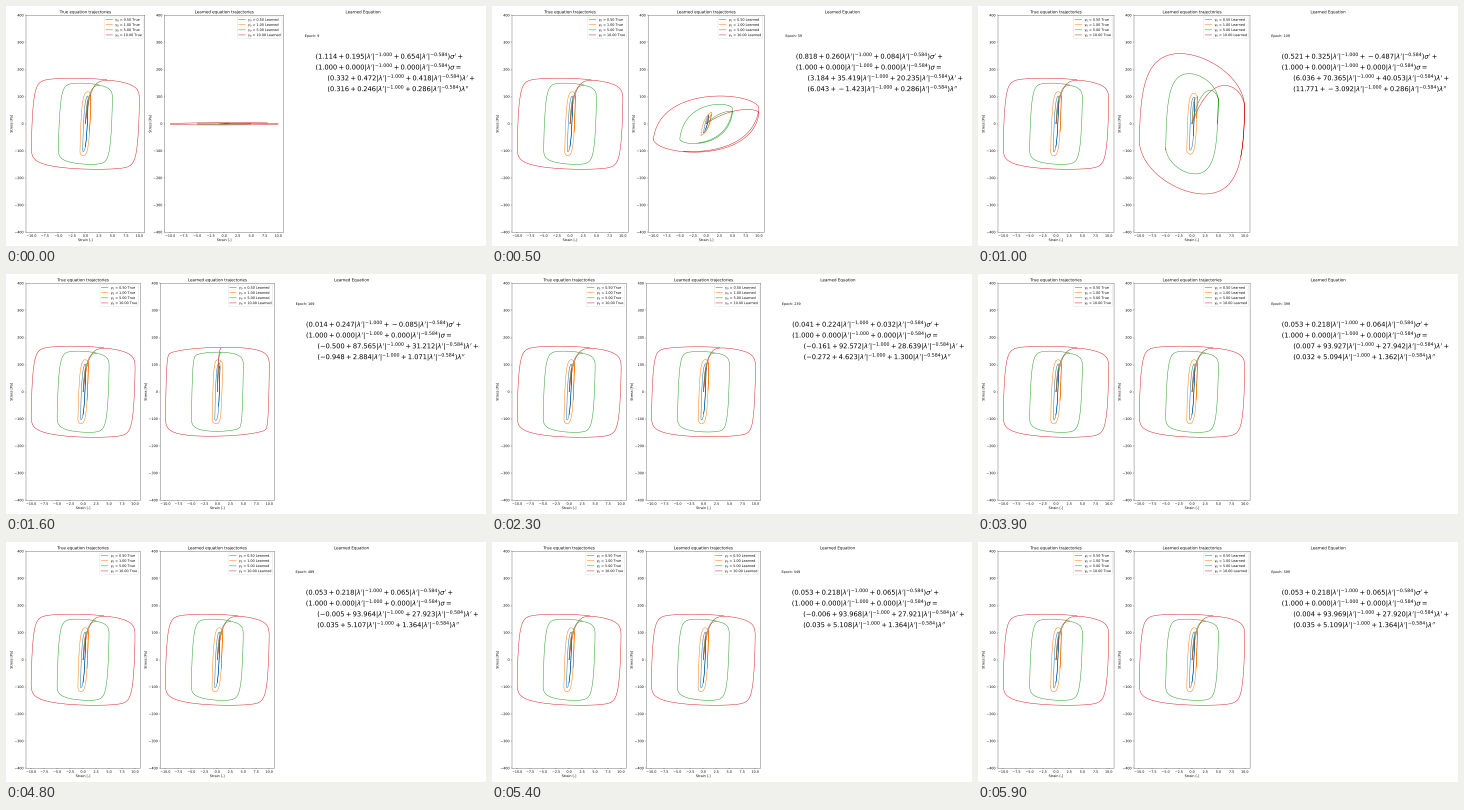
A matplotlib script that plays this animation: 480 px wide and 240 px high, repeating every 6000 ms.

```python
import numpy as np
import matplotlib.pyplot as plt
from matplotlib import patheffects
from matplotlib.animation import FuncAnimation
from matplotlib.lines import Line2D
from matplotlib.patches import FancyBboxPatch
from matplotlib.transforms import ScaledTranslation

# Text drawn as outlines keeps sub-pixel placement at this small size.
plt.rcParams.update({
    "font.family": "DejaVu Sans",
    "path.effects": [patheffects.Normal()],
    "path.snap": False,
    "text.hinting": "none",
    "savefig.dpi": "figure",
})

W, H = 480, 240
FRAMES, GROWTH = 60, 10
TOP, BOTTOM, GAP = 9.3, 226.2, 20
POWER = 0.584
AMPS = np.array([0.5, 1.0, 5.0, 10.0])
COLORS = ["tab:blue", "tab:orange", "tab:green", "tab:red"]

# Rows: relaxation, viscosity, inertia. Columns: powers 0, -1, -POWER.
START = np.array([[1.114, 0.195, 0.654], [0.332, 0.472, 0.418], [0.316, 0.246, 0.286]])
PEAK = np.array([[0.521, 0.325, -0.487], [6.036, 70.365, 40.053], [11.771, -3.092, 0.286]])
END = np.array([[0.053, 0.218, 0.065], [0, 93.97, 27.92], [0.035, 5.109, 1.364]])


def learned_coefs():
    """Linear growth to the peak, then decay; constant terms overshoot once."""
    k = np.arange(FRAMES)[:, None, None]
    late = np.maximum(k - GROWTH, 0)
    decay = np.exp(-late / 4.6)
    overshoot = (1 - late / 3.5) * np.exp(-late / 2.8)
    fade = np.concatenate([overshoot, decay, decay], axis=2)
    coefs = np.where(k < GROWTH, START + (PEAK - START) * k / GROWTH,
                     END + (PEAK - END) * fade)
    wobble = 0.008 * (1 - decay) * np.cos(2 * np.pi * (k - 39.2) / 24)
    coefs[:, 1, 0] += wobble[:, 0, 0]
    return coefs.transpose(1, 0, 2)


CYCLE = 800
times = np.linspace(0, 4 * np.pi, 2 * CYCLE + 1)
strain = AMPS * np.sin(times)[:, None]


def slope(t, stress, coefs):
    """Stress rate, with the whole equation multiplied by |strain rate|."""
    rate, accel = AMPS * np.cos(t), -AMPS * np.sin(t)
    r = np.abs(rate)
    basis = np.stack([r, np.ones_like(r), r ** (1 - POWER)])
    tau, eta, kappa = coefs @ basis
    return (eta * rate + kappa * accel - r * stress) / tau


def simulate(coefs):
    dt = times[1]
    stress = np.zeros((coefs.shape[1], len(AMPS)))
    path = [stress]
    for t in times[:-1]:
        mid = stress + dt / 2 * slope(t, stress, coefs)
        stress = stress + dt * slope(t + dt / 2, mid, coefs)
        path.append(stress)
    path = np.array(path)
    # Thin strokes darken where they overlap, so skip what retraces cycle one.
    retraced = np.abs(path[CYCLE:] - path[:-CYCLE]) < 2
    path[CYCLE:][retraced] = np.nan
    return path


learned = learned_coefs()
true_stress = simulate(END[:, None, :])[:, 0]
learned_stress = simulate(learned)

fig, (ax_true, ax_learned, ax_eq) = plt.subplots(1, 3, figsize=(20, 10), dpi=24)


def add_legend(ax, kind, text_width):
    """Legend laid out in pixels from the upper right corner of the axes."""
    corner = ScaledTranslation(1, 1, ax.transAxes)
    x = -3 - text_width
    left = x - 10.67
    box = FancyBboxPatch((left, -23), -1.67 - left, 21.33,
                         boxstyle="round,pad=0,rounding_size=0.67",
                         fc="white", ec="0.8", lw=1, alpha=0.8,
                         transform=corner, zorder=4)
    ax.add_artist(box)
    for i, (amp, color) in enumerate(zip(AMPS, COLORS)):
        y = -5.5 - 5.1 * i
        ax.add_artist(Line2D([x - 9.33, x - 2.67], [y + 1.17] * 2, color=color,
                             lw=1.5, transform=corner, zorder=5))
        ax.text(x, y, rf"$\gamma_0$ = {amp:.2f} {kind}", transform=corner, zorder=5)


def setup_plot(ax, kind, text_width):
    ax.set(title=f"{kind} equation trajectories", xlabel="Strain [-]",
           ylabel="Stress [Pa]", xlim=(-11, 11), ylim=(-400, 400),
           xticks=np.arange(-10, 10.1, 2.5), yticks=np.arange(-400, 401, 100))
    add_legend(ax, kind, text_width)
    return [ax.plot([], [], color=c, lw=1.5)[0] for c in COLORS]


true_lines = setup_plot(ax_true, "True", 26.6)
learned_lines = setup_plot(ax_learned, "Learned", 32.6)
for i, line in enumerate(true_lines):
    line.set_data(strain[:, i], true_stress[:, i])

ax_eq.axis("off")
ax_eq.set_title("Learned Equation")
epoch = ax_eq.text(0.01, 0.9, "", transform=ax_eq.transAxes)
rows = [ax_eq.text(x, y, "", fontsize=20, transform=ax_eq.transAxes)
        for x, y in [(0.1, 0.8), (0.1, 0.75), (0.2, 0.7), (0.2, 0.65)]]


def formula(c, tail):
    rate = r"|\lambda'|"
    return (rf"$({c[0]:.3f} + {c[1]:.3f}{rate}^{{-1.000}}"
            rf" + {c[2]:.3f}{rate}^{{-{POWER}}}){tail}$")


def arrange():
    """Share the width left over by the longest equation row."""
    base = 109.4
    reach = max(row.get_position()[0] * base + row.get_window_extent().width
                for row in rows)
    width = (504.4 + 0.2 * base - reach) / 3
    for i, ax in enumerate((ax_true, ax_learned, ax_eq)):
        left = GAP + i * (width + GAP)
        ax.set_position([left / W, 1 - BOTTOM / H, width / W, (BOTTOM - TOP) / H])


def update(k):
    for i, line in enumerate(learned_lines):
        line.set_data(strain[:, i], learned_stress[:, k, i])
    tau, eta, kappa = learned[:, k]
    epoch.set_text(f"Epoch: {9 + 10 * k}")
    rows[0].set_text(formula(tau, r"\sigma' +"))
    rows[1].set_text(formula((1, 0, 0), r"\sigma ="))
    rows[2].set_text(formula(eta, r"\lambda' +"))
    rows[3].set_text(formula(kappa, r"\lambda''"))
    arrange()
    return learned_lines + rows + [epoch]


anim = FuncAnimation(fig, update, frames=FRAMES, interval=100, repeat=True,
                     repeat_delay=0, blit=False)
plt.show()
```
